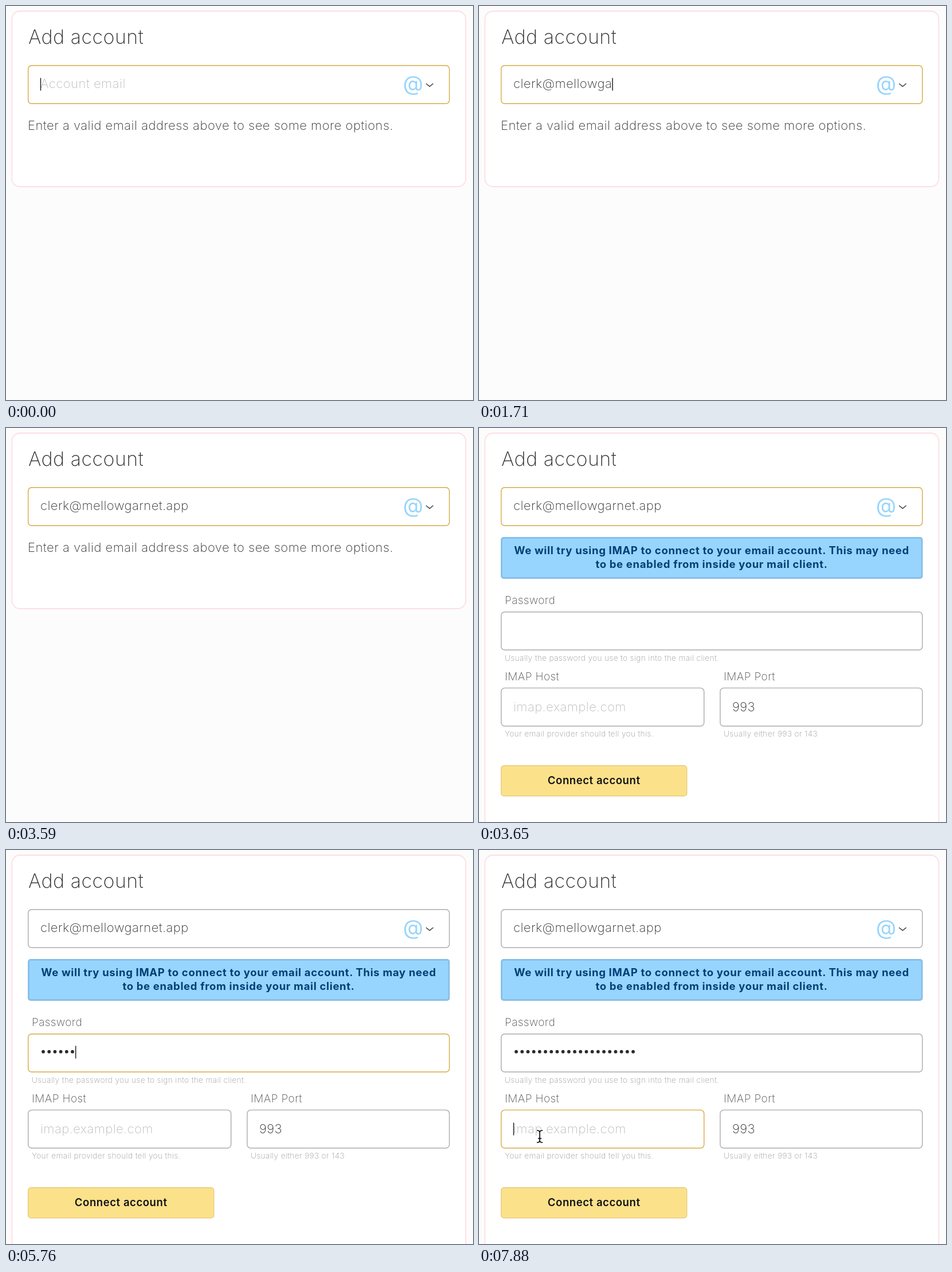
Recreate the animation shown at these times as an HTML page. Size 815 by 687 pixels, loop 8 s.

```html
<!DOCTYPE html>
<html lang="en">
<head>
<meta charset="utf-8">
<title>Add account</title>
<style>
  html, body { margin: 0; width: 100%; height: 100%; overflow: hidden; background: #fcfcfc; }
  svg { display: block; width: 100vw; height: 100vh; }
  text {
    font: 250 22px Inter, "Open Sans", sans-serif;
    font-optical-sizing: none;
    letter-spacing: .022em;
    fill: #333;
    white-space: pre;
  }
  .title { font-size: 34px; letter-spacing: .014em; }
  .label { font-size: 19px; fill: #505050; }
  .note { font-size: 13.7px; letter-spacing: .026em; fill: #999; }
  .ghost { fill: #bdbdbd; }
  .address { letter-spacing: .019em; }
  .notice { font-size: 18.5px; font-weight: 700; letter-spacing: .036em; fill: #003f75; text-anchor: middle; }
  .action { font-size: 18.5px; font-weight: 600; letter-spacing: .031em; fill: #111; text-anchor: middle; }
  .at { font-size: 36.5px; font-weight: 400; letter-spacing: 0; fill: #97d5fc; text-anchor: middle; }
  .card { fill: #fff; stroke: #fddfe2; stroke-width: 1.8; }
  .field { fill: #fff; stroke: #ababab; stroke-width: 1.4; }
  .field.focus { stroke: #d6aa42; }
</style>
</head>
<body>
<svg viewBox="0 0 815 687">
  <rect id="card" class="card" x="10.3" y="9" width="792" height="306" rx="14"/>
  <text class="title" x="39" y="66">Add account</text>

  <rect id="email" class="field" x="38.7" y="103.7" width="735" height="66.5" rx="6"/>
  <text id="emailGhost" class="ghost" x="60" y="142.7">Account email</text>
  <text id="emailText" class="address" x="60" y="142.7"></text>
  <text class="at" x="710.5" y="148">@</text>
  <path d="M733 135.2L739.3 140.3L745.6 135.2" fill="none" stroke="#333" stroke-width="1.3"/>

  <text id="prompt" x="38" y="215.7">Enter a valid email address above to see some more options.</text>

  <g id="form">
    <rect x="39.5" y="191.5" width="733.5" height="70" rx="3.5" fill="#97d5ff" stroke="#89bfe9" stroke-width="3"/>
    <text class="notice" x="406" y="219.5">We will try using IMAP to connect to your email account. This may need</text>
    <text class="notice" x="406" y="244">to be enabled from inside your mail client.</text>

    <text class="label" x="45" y="306.5">Password</text>
    <rect id="password" class="field" x="38.7" y="320.7" width="735" height="66.3" rx="6"/>
    <g id="dots" fill="#2b2b2b"></g>
    <text class="note" x="45" y="405.5">Usually the password you use to sign into the mail client.</text>

    <text class="label" x="45" y="439.5">IMAP Host</text>
    <rect id="host" class="field" x="38.7" y="453.4" width="354" height="66.3" rx="6"/>
    <text class="ghost address" x="60" y="493.7">imap.example.com</text>
    <text class="note" x="45" y="538">Your email provider should tell you this.</text>

    <text class="label" x="427" y="439.5">IMAP Port</text>
    <rect class="field" x="420.9" y="453.4" width="352.8" height="66.3" rx="6"/>
    <text x="442" y="493.7">993</text>
    <text class="note" x="427" y="538">Usually either 993 or 143</text>

    <rect x="38.6" y="588.6" width="324.2" height="53" rx="5" fill="#fce18b" stroke="#e3c774" stroke-width="1.2"/>
    <text class="action" x="200.7" y="621">Connect account</text>
  </g>

  <rect id="caret" width="1.5" height="22" fill="#222"/>

  <g id="pointer" fill="none" stroke-linecap="round">
    <circle id="press" r="22.3" stroke="#000" stroke-width="2"/>
    <!-- black beam on a white halo -->
    <path class="beam" stroke="#fff" stroke-width="3.6"/>
    <path class="beam" stroke="#000" stroke-width="1.6"/>
  </g>
</svg>
<script>
const LOOP = 8000;
const EMAIL = "clerk@mellowgarnet.app";
const KEY_TIMES = [120, 240, 360, 480, 600, 700, 940, 1000, 1060, 1240, 1240,
  1410, 1530, 1650, 1940, 2080, 2200, 2360, 2590, 2700, 2820, 2940];
const FORM_AT = 3650, PASSWORD_AT = 4880, HOST_AT = 7880;
const DOTS = { start: 5120, every: 120, count: 21, pitch: 10.2 };
const MOVES = [
  { start: 4410, end: 4820, hide: 5120, from: [128, 152], to: [114.7, 373] },
  { start: 7650, end: 7820, hide: LOOP, from: [114.7, 373], to: [106, 499.5] },
];
const PRESS_MS = 60;
const BEAM = "M-4.5 -10.5Q0 -10.5 0 -7Q0 -10.5 4.5 -10.5M0 -7V7" +
  "M-4.5 10.5Q0 10.5 0 7Q0 10.5 4.5 10.5M-2.5 3.5H2.5";

const $ = id => document.getElementById(id);
const show = (node, on) => node.setAttribute("visibility", on ? "visible" : "hidden");
const within = (t, a, b) => t >= a && t < b;
const ease = p => p * p * (3 - 2 * p);

document.querySelectorAll(".beam").forEach(path => path.setAttribute("d", BEAM));

const dots = Array.from({ length: DOTS.count }, (_, i) => {
  const dot = document.createElementNS("http://www.w3.org/2000/svg", "circle");
  dot.setAttribute("cx", 65 + i * DOTS.pitch);
  dot.setAttribute("cy", 351.7);
  dot.setAttribute("r", 2.9);
  return $("dots").appendChild(dot);
});

function placeCaret(focus, typedDots, t) {
  let x = 59.7, y = 125.5;
  if (focus === "email" && $("emailText").textContent) x = 60 + $("emailText").getComputedTextLength();
  if (focus === "password") { x += typedDots * DOTS.pitch; y = 341.5; }
  if (focus === "host") y = 475.5;
  $("caret").setAttribute("x", x);
  $("caret").setAttribute("y", y);
  show($("caret"), !within(t, 3590, 4240));
}

function placePointer(t) {
  const move = MOVES.find(m => within(t, m.start, m.hide));
  show($("pointer"), move);
  show($("press"), move && within(t, move.end, move.end + PRESS_MS));
  if (!move) return;
  const p = ease(Math.min(1, (t - move.start) / (move.end - move.start)));
  const [x, y] = move.from.map((v, i) => v + (move.to[i] - v) * p);
  $("pointer").setAttribute("transform", `translate(${x} ${y})`);
}

function render(t) {
  const typed = KEY_TIMES.filter(k => k <= t).length;
  $("emailText").textContent = EMAIL.slice(0, typed);
  show($("emailGhost"), !typed);

  const open = t >= FORM_AT;
  $("card").setAttribute("height", open ? 760 : 306);
  $("form").style.display = open ? "" : "none";
  show($("prompt"), !open);

  const focus = t >= HOST_AT ? "host" : t >= PASSWORD_AT ? "password" : "email";
  for (const id of ["email", "password", "host"]) $(id).classList.toggle("focus", id === focus);

  const typedDots = Math.max(0, Math.min(DOTS.count, Math.floor((t - DOTS.start) / DOTS.every) + 1));
  dots.forEach((dot, i) => show(dot, i < typedDots));

  placeCaret(focus, typedDots, t);
  placePointer(t);
}

const begin = performance.now();
function tick() {
  render((performance.now() - begin) % LOOP);
  requestAnimationFrame(tick);
}
tick();
</script>
</body>
</html>
```
